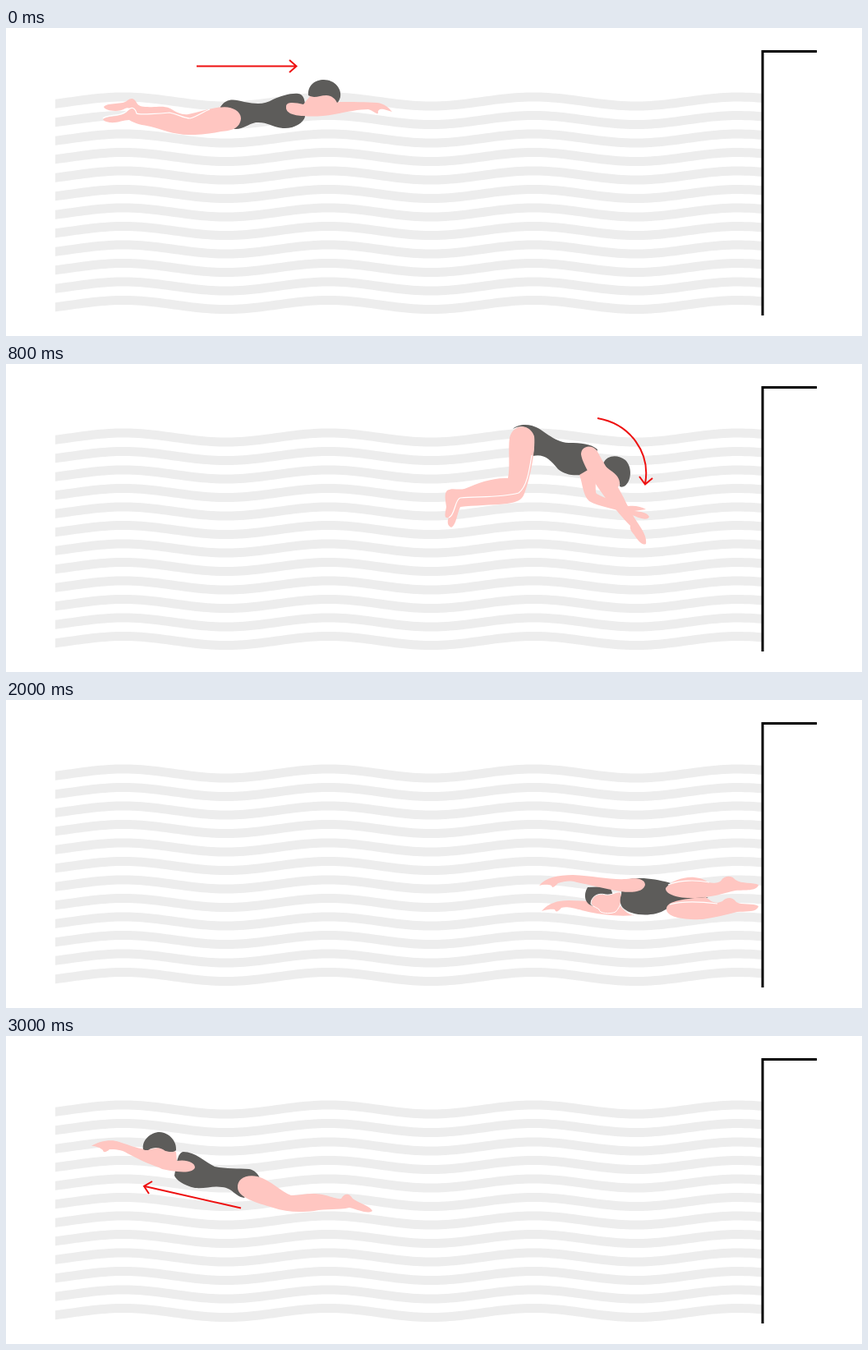
Recreate the animation shown at these times as an HTML page. Size 1042 by 375 pixels, loop 3200 ms.

```html
<!DOCTYPE html>
<html lang="en">
<head>
<meta charset="utf-8">
<title>Flip turn</title>
<style>
  html, body { margin: 0; width: 100%; height: 100%; overflow: hidden; background: #fff; }
  svg { display: block; }
  body > svg { width: 100%; height: 100%; }
  .skin, .edge { fill: #ffc6c1; }
  .edge { stroke: #fff; stroke-width: 1; }
  .suit { fill: #5d5c5a; }
  .line { fill: none; stroke: #fff; stroke-width: 1.2; }
  .arrow { fill: none; stroke: #ee1010; stroke-width: 2; }
  .wall { fill: none; stroke: #000; stroke-width: 3; }
  #waves { fill: none; stroke: #ededed; stroke-width: 11; }
  .pose { visibility: hidden; animation: show 3.2s step-end infinite; animation-delay: calc((var(--i) - 16) * .2s); }
  @keyframes show {
    0% { visibility: visible; }
    6.25%, 100% { visibility: hidden; }
  }
</style>
</head>
<body>
<svg viewBox="0 0 1042 375">
  <defs>
    <!-- surface swimming -->
    <g id="swimBody">
      <path class="skin" d="M119 96C124 90 143 94 148 88C152 85 156 85 159 91C161 95 165 96 172 96C184 97 190 94 200 98C208 103 214 106 222 105C236 102 248 98 262 96L270 110L225 125L160 110C155 100 150 95 145 98C138 103 120 101 119 96Z"/>
      <path class="suit" d="M261 96C268 86 276 86 290 90C306 93 315 93 325 87C335 83 346 79 356 80C362 81 363 86 364 92L364 108C362 116 350 123 337 122C322 120 318 114 304 115C294 117 288 124 278 123L265 110Z"/>
      <path class="skin" d="M118 111C124 106 142 109 148 101C152 97 157 97 158 103C160 106 190 104 199 103C210 105 216 110 224 110C235 108 246 100 259 97C272 94 286 100 286 110C285 122 275 125 262 126C248 129 234 130 222 130C205 130 188 123 176 120C166 118 158 117 150 112C142 112 136 116 126 115C121 114 119 113 118 111Z"/>
      <path class="line" d="M118 110C124 105 142 108 148 100C152 96 157 96 159 104C162 106 190 104 199 103C210 105 216 110 224 110C232 108 240 102 248 99"/>
    </g>
    <path id="cap" class="suit" d="M368 82C367 70 376 63 387 63C400 63 409 74 407 84C406 87 405 90 403 91C401 86 396 82 390 82C384 82 380 84 375 84C371 83 369 83 368 82Z"/>
    <g id="frontArm">
      <path class="skin" d="M562 83C566 86 570 82 572 81L600 82L606 92C600 95 596 99 593 106C588 108 580 108 574 109C575 104 572 101 570 100L563 101Z"/>
      <path class="skin" d="M603 87C620 86 635 86 645 84C655 82 668 82 675 90C668 89 662 88 657 91C660 92 660 96 655 96C650 95 645 94 640 94C628 96 612 98 600 100Z"/>
    </g>
    <path id="straight" class="arrow" d="M232 46.5H353M345 39L353.5 46.5L345 54"/>

    <!-- diving into the turn -->
    <g id="pike">
      <path class="suit" d="M617 79C622 74 632 73 640 75C655 79 665 95 685 96C700 96 712 97 720 104L711 132C700 137 682 137 672 128C662 116 655 109 641 112C645 100 643 85 634 78C628 75 622 76 617 79Z"/>
      <path class="skin" d="M719 112L730 122C740 126 748 136 747 146C746 152 740 152 736 150Z"/>
      <path class="suit" d="M727 121C732 110 745 110 754 117C763 126 761 142 754 148C751 150 749 150 747 149C748 142 745 136 738 131C733 128 729 124 727 121Z"/>
    </g>
    <g id="reach">
      <path class="skin" d="M698 135L715 125C720 140 716 155 719 158C735 166 750 172 758 173C766 172 774 174 779 177L765 179C772 180 780 180 783 186C780 192 770 187 760 183C742 176 722 174 710 167C702 160 702 145 698 135Z"/>
      <path class="skin" d="M700 110C700 100 712 97 719 105C727 120 740 140 752 163C758 176 765 188 770 195C776 204 780 211 779 219C774 222 768 213 764 207C761 204 759 200 760 197C750 187 742 176 738 173C725 158 702 125 700 110Z"/>
    </g>

    <!-- on the back at the wall -->
    <g id="supine">
      <path class="skin" d="M652 257C660 248 670 244 685 244C705 245 725 245 745 247C752 258 760 262 765 262C745 264 722 261 705 257C690 253 682 251 676 253C672 258 669 259 668 255C662 254 656 256 652 257Z"/>
      <path class="suit" d="M708 228C702 238 705 249 715 251L740 240L735 227Z"/>
      <path class="edge" d="M712 248C712 240 720 234 730 237C738 238 742 233 748 234C752 240 748 252 742 258C735 261 722 260 722 255C718 252 713 251 712 248Z"/>
    </g>
    <path id="backSuit" class="suit" d="M750 220C770 214 790 218 806 222L855 241C830 241 815 247 803 255C790 264 765 263 755 256C748 252 746 245 749 237Z"/>
    <path id="upperArm" class="skin" d="M649 226C657 216 672 213 690 213C715 214 735 219 755 218C768 216 778 218 778 225C776 234 762 235 748 233C730 230 710 225 695 222C685 219 680 221 672 223C668 227 665 230 664 226C659 224 653 225 649 226Z"/>

    <!-- gliding away -->
    <path id="farArm" class="skin" d="M534 211C542 207 555 206 563 211C575 215 585 218 594 221L596 238C588 235 575 226 565 218C558 214 552 215 550 219C545 222 543 219 547 216C543 213 538 212 534 211Z"/>
    <g id="glide">
      <path class="suit" d="M627 265C630 252 630 237 638 236C652 236 664 248 676 254C690 257 705 256 718 257C724 258 729 263 731 268L712 292C700 290 698 280 685 279C675 277 665 281 652 280C638 277 629 270 627 265Z"/>
      <path class="skin" d="M526 229C535 223 550 220 560 224C575 229 588 234 597 233L612 230L629 236L630 247C642 245 652 249 652 255C650 262 635 261 622 259L612 257L608 255C595 251 580 243 570 238C562 233 555 233 548 233C544 237 540 237 540 234C537 231 531 229 526 229Z"/>
      <path class="suit" d="M589 233C587 222 598 212 609 212C622 213 630 224 629 234C627 237 620 236 616 235C610 231 603 229 595 234C592 234 590 234 589 233Z"/>
    </g>
    <g id="stroke">
      <use href="#glide" x="-164" y="-25"/>
      <path class="skin" d="M540 255C540 245 550 240 564 243C585 246 600 252 620 253C650 254 672 254 684 254C690 248 696 248 702 253C712 256 726 254 728 259C724 265 708 264 698 264C670 268 640 272 610 272C575 270 540 268 540 255Z"/>
      <use href="#rising" x="-139" y="-33"/>
    </g>
    <path id="rising" class="arrow" d="M697 305.5L580 279M589 273L579 278.8L585 288"/>
  </defs>

  <svg x="60" width="860" height="375" viewBox="60 0 860 375"><g id="waves"></g></svg>
  <path class="wall" d="M921 350V28.5H987"/>

  <g class="pose" style="--i:0">
    <use href="#swimBody"/>
    <path class="skin" d="M341 96C341 89 352 91 362 93C366 88 370 83 372 81L398 82C402 88 404 91 406 90C420 90 440 90 452 91C460 92 466 97 470 102L460 99C456 98 452 99 453 104C450 105 448 101 441 99C430 99 415 102 400 105C385 108 370 108 362 107C350 107 340 103 341 96Z"/>
    <use href="#cap"/>
    <use href="#straight"/>
  </g>

  <g class="pose" style="--i:1">
    <use href="#swimBody" x="110"/>
    <use href="#frontArm" x="-90"/>
    <path class="skin" d="M449 96C449 88 460 88 468 94C480 103 489 110 488 117C486 124 476 130 472 137C469 143 463 145 460 141C460 135 468 126 470 119C465 112 449 106 449 96Z"/>
    <use href="#cap" x="108"/>
    <use href="#straight" x="141"/>
  </g>

  <g class="pose" style="--i:2">
    <path class="skin" d="M327 124C335 119 341 119 347 111C352 106 365 104 368 111C372 114 385 110 396 112L412 117C398 120 380 122 368 124C358 126 350 124 342 126C336 129 330 130 327 126Z"/>
    <path class="suit" d="M452 81C458 72 464 70 474 73C484 76 500 80 515 79C530 76 540 73 552 75C560 77 564 86 564 96C562 110 550 117 535 117C520 117 514 108 500 106C488 106 482 110 468 109L460 95Z"/>
    <path class="skin" d="M325 87C332 84 340 87 350 86C358 83 367 81 369 87C368 93 372 95 380 95C392 97 402 104 413 100C425 92 440 83 455 80C468 78 477 86 476 97C475 106 466 109 454 111C440 114 425 118 410 117C396 117 384 113 372 105C364 100 360 97 352 96C344 97 332 96 328 93C325 91 324 89 325 87Z"/>
    <path class="line" d="M368 103C382 112 394 117 410 117.5"/>
    <path class="skin" d="M469 64C474 69 480 72 486 72C494 73 500 66 508 62C518 58 532 59 540 65C548 72 555 84 557 94C557 100 552 103 547 101C540 98 536 88 530 78C524 74 518 76 510 80C502 86 494 90 487 87C482 83 480 78 483 76C476 76 470 70 469 64Z"/>
    <use href="#frontArm"/>
    <use href="#cap" x="198" y="-1"/>
    <use href="#straight" x="281"/>
  </g>

  <g class="pose" style="--i:3">
    <g transform="translate(-47 5) rotate(-18 630 85)"><use href="#pike"/><use href="#reach"/></g>
    <path class="skin" d="M566 92C572 78 590 78 594 92C596 112 585 132 570 144C552 152 525 148 500 146C488 147 470 158 458 156C451 153 452 148 458 144C468 138 474 130 484 130C500 134 525 128 545 124C553 114 560 102 566 92Z"/>
  </g>

  <g class="pose" style="--i:4">
    <use href="#pike"/>
    <path class="skin" d="M613 90C617 72 638 72 643 88C645 105 637 145 630 160C627 166 622 168 610 170C590 172 570 172 553 174C549 182 548 196 542 199C537 197 537 191 539 187C532 189 535 180 536 174C535 165 533 158 537 154C543 150 550 154 558 152C575 145 592 138 611 139C614 125 611 105 613 90Z"/>
    <path class="line" d="M640 111C637 130 634 150 624 157C602 163 575 161 553 163C546 165 547 184 539 187"/>
    <use href="#reach"/>
    <path class="arrow" d="M720 66C760 73 785 108 778 146M771 137L778 146.5L787 139"/>
  </g>

  <g class="pose" style="--i:5">
    <use href="#pike" transform="translate(78 7) rotate(30 630 85)"/>
    <path class="skin" d="M693 97C700 78 722 80 727 97C727 115 715 140 705 158C695 168 680 170 668 174C656 180 645 192 637 192C630 192 630 187 636 182C644 174 646 162 656 160C668 160 678 150 685 145C688 130 688 112 693 97Z"/>
    <path class="skin" d="M757 148C762 138 777 140 778 151C778 166 768 181 764 194C762 205 764 212 766 220C767 227 765 234 761 234C757 229 755 222 754 216C748 208 745 198 748 188C751 174 752 160 757 148Z"/>
  </g>

  <g class="pose" style="--i:6">
    <path class="suit" d="M785 83C800 78 818 80 823 90C828 100 826 120 826 145C824 165 812 182 800 184L783 170C778 160 780 152 788 145C797 135 797 125 793 117L790 95Z"/>
    <path class="skin" d="M782 127L748 160C740 168 732 173 724 180C716 184 708 194 701 200C696 201 692 199 694 195C698 191 706 186 707 176C709 168 712 162 718 160C728 160 750 152 766 140Z"/>
    <path class="skin" d="M805 95C805 106 797 115 790 121C782 128 775 135 766 142C752 152 733 156 718 161C708 163 698 169 690 171C682 173 675 172 675 169C676 165 686 162 693 155C697 146 703 140 710 143C714 146 716 149 722 147C735 142 748 133 756 130C764 115 770 100 782 87C792 78 805 84 805 95Z"/>
    <path class="line" d="M765 143C752 152 733 156 717 161"/>
    <path class="skin" d="M762 172C770 170 776 164 781 159L783 170L768 175Z"/>
    <path class="skin" d="M788 163C790 150 806 148 811 160C811 172 805 182 796 187C788 190 780 192 774 194C768 199 758 203 750 202L739 215C734 222 735 235 734 248C731 246 731 240 729 236C728 244 728 252 725 255C722 250 725 238 724 232C720 236 712 241 708 238C710 234 713 232 716 230L709 231C714 225 720 222 726 221C727 217 727 213 727 210C727 198 732 188 738 185C745 178 755 178 770 173C778 170 785 170 788 163Z"/>
    <path class="line" d="M734 221L741 209L749 201M725 226L726 211"/>
    <path class="suit" d="M749 197C748 208 758 217 770 217C783 216 792 204 790 192C789 188 787 187 784 188C778 190 774 193 770 196C764 200 756 201 749 197Z"/>
    <path class="arrow" d="M738 231C695 240 657 215 653 182M648 191L653 181.5L662 187"/>
  </g>

  <g class="pose" style="--i:7">
    <path class="suit" d="M770 175C790 165 800 140 815 120C835 98 875 95 883 125C886 160 850 205 800 220C775 222 762 200 770 175Z"/>
    <path class="skin" d="M870 112C872 130 855 140 835 136C810 132 785 128 775 114C768 100 775 85 790 80C800 74 815 66 830 67C836 70 830 76 822 79C812 84 805 92 805 96C820 98 840 95 855 97C865 99 869 104 870 112Z"/>
    <g transform="translate(15 -50) rotate(-20 760 235)"><use href="#supine"/><use href="#upperArm"/></g>
  </g>

  <g class="pose" style="--i:8">
    <use href="#supine" x="5" y="-20"/>
    <path class="suit" d="M755 200C775 195 790 185 805 165C825 140 850 145 852 165C850 200 815 235 780 241C760 241 750 225 755 200Z"/>
    <path class="skin" d="M812 160C808 135 805 110 812 92C820 74 835 72 850 76C870 82 885 84 893 82C900 78 905 84 905 95C905 105 900 110 896 104C885 100 862 102 842 102C844 120 855 145 852 168C845 185 815 182 812 160Z"/>
    <use href="#upperArm" x="5" y="-20"/>
  </g>

  <g class="pose" style="--i:9">
    <g transform="translate(-10 -5)"><use href="#supine"/><use href="#backSuit"/><use href="#upperArm"/></g>
    <path class="skin" d="M790 225C800 205 815 165 835 140C845 128 858 130 865 142C875 160 885 180 895 190C905 190 912 200 912 212C911 218 906 216 903 208C890 205 875 190 862 172C852 190 840 225 828 240C812 250 790 245 790 225Z"/>
  </g>

  <g class="pose" style="--i:10">
    <use href="#supine"/>
    <use href="#backSuit"/>
    <path class="skin" d="M803 229C810 220 825 215 838 216C848 217 852 220 855 222C862 224 870 222 871 219C876 213 884 214 888 219C895 224 910 222 916 225C914 233 900 231 888 232C875 235 865 238 858 239C845 241 830 242 820 240C810 238 802 234 803 229Z"/>
    <path class="line" d="M806 225C820 219 840 219 856 222"/>
    <path class="skin" d="M804 254C804 246 820 242 852 240C856 243 862 250 872 245C877 240 884 239 889 246C895 250 910 247 916 251C914 259 900 257 890 258C875 262 862 265 848 267C825 268 803 264 804 254Z"/>
    <path class="line" d="M808 249C825 244 850 246 866 248"/>
    <use href="#upperArm"/>
  </g>

  <g class="pose" style="--i:11">
    <use href="#farArm" x="88"/>
    <use href="#glide" x="88"/>
    <path class="skin" d="M790 280C790 268 802 263 816 266C835 270 848 268 862 262C872 258 876 254 879 247C886 242 892 246 897 250C905 254 917 253 918 260C910 266 895 263 886 268C872 284 850 296 828 297C808 296 790 292 790 280Z"/>
    <use href="#rising" x="80" y="18"/>
  </g>

  <g class="pose" style="--i:12">
    <use href="#farArm"/>
    <use href="#glide"/>
    <path class="skin" d="M731 267C745 271 755 283 770 283C785 277 805 276 820 277C828 277 832 277 833 273C838 269 843 271 848 277C856 281 868 282 871 288C865 291 850 288 838 290C825 293 810 290 795 291L740 290Z"/>
    <path class="skin" d="M704 280C704 270 712 264 724 266C742 267 752 280 764 287C772 292 785 290 797 287C810 286 822 290 830 291C834 285 841 288 846 295C854 299 867 303 868 309C860 313 848 309 838 306C825 306 800 308 782 309C765 310 745 304 725 297C712 293 704 288 704 280Z"/>
    <path class="line" d="M729 267C744 269 752 280 764 287C772 292 785 290 797 287C810 286 822 290 830 291C834 285 841 288 847 296"/>
    <use href="#rising"/>
  </g>

  <g class="pose" style="--i:13"><use href="#stroke"/></g>
  <g class="pose" style="--i:14"><use href="#stroke" x="-144" y="-33"/></g>

  <g class="pose" style="--i:15">
    <use href="#glide" x="-422" y="-95"/>
    <path class="skin" d="M282 185C281 174 292 168 306 171C322 175 335 190 347 194C360 194 370 190 385 193C395 195 403 199 408 198C412 191 418 191 422 198C430 204 444 207 446 213C440 217 430 212 418 209C405 212 390 210 375 213C355 215 340 214 325 209C305 203 283 197 282 185Z"/>
    <use href="#rising" x="-411" y="-96"/>
  </g>
</svg>
<script>
  const period = 249.5, crest = 143, amplitude = 5.5;
  let wave = "";
  for (let x = 50; x <= 930; x += 5) {
    const y = 89.5 - amplitude * Math.cos((x - crest) / period * 2 * Math.PI);
    wave += `${wave ? "L" : "M"}${x} ${y.toFixed(2)}`;
  }
  document.getElementById("waves").innerHTML = Array.from({ length: 12 },
    (_, row) => `<path d="${wave}" transform="translate(0 ${row * 22.5})"/>`).join("");
</script>
</body>
</html>
```
